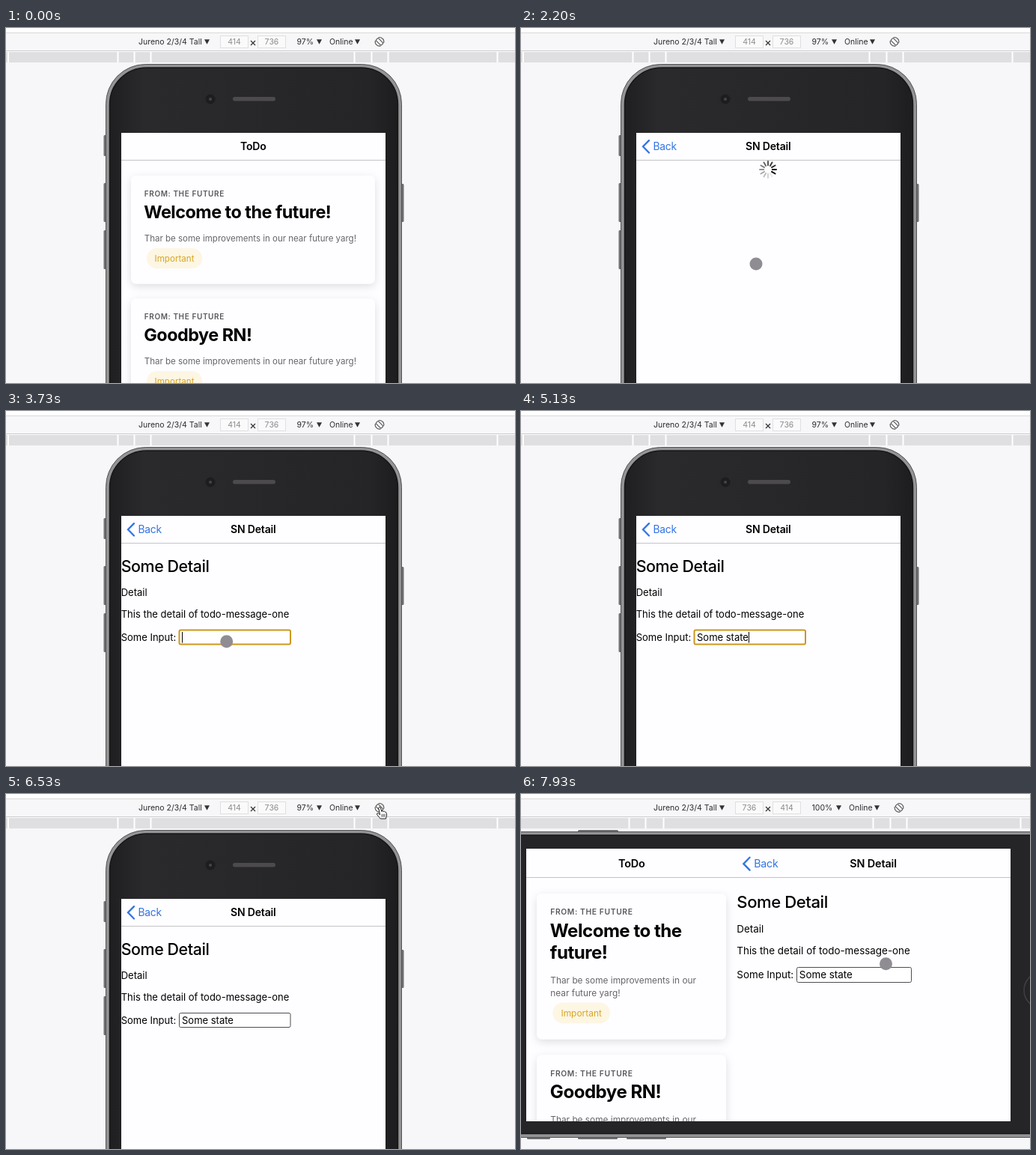
These frames come from a looping animation (680x474 px, 8 s). An HTML page:

```html
<!DOCTYPE html>
<html lang="en">
<head>
<meta charset="utf-8">
<title>Device rotation</title>
<style>
html, body { margin: 0; width: 100%; height: 100%; overflow: hidden; background: #f7f6f8; }
svg { display: block; width: 680px; height: 474px; }
text { font-family: Inter, "Open Sans", sans-serif; white-space: pre; }
</style>
</head>
<body>
<svg id="stage" viewBox="0 0 680 474"></svg>
<script>
const LOOP = 8000;
const ROTATE = 6600;
const INPUT = 'Some state';

const rect = (x, y, w, h, fill, more = '') =>
  `<rect x="${x}" y="${y}" width="${w}" height="${h}" fill="${fill}" ${more}/>`;
const text = (x, y, str, size, weight = 400, fill = '#000', more = '') =>
  `<text x="${x}" y="${y}" font-size="${size}" font-weight="${weight}" fill="${fill}" ${more}>${str}</text>`;
const group = (id, body) => `<g id="${id}">${body}</g>`;
const mid = 'text-anchor="middle"';
const arrowDown = x => `<path d="M${x} 15.2h7l-3.5 6.6z" fill="#333"/>`;

function toolbar(o) {
  const field = (x, v) => rect(x + .5, 10.5, 37, 16, '#fafafb', 'stroke="#e0dfe1"') +
    text(x + 19, 22.3, v, 10.5, 400, '#8c8b8e', mid);
  return text(177, 22.3, 'Jureno 2/3/4 Tall', 10.5, 400, '#2c2b2d') + arrowDown(265) +
    field(286, o.w) + field(336, o.h) +
    '<path d="M327 17l6 6m0-6l-6 6" stroke="#333" stroke-width="1.2"/>' +
    text(388.5, 22.3, o.zoom, 10.5, 400, '#2c2b2d') + arrowDown(415 + o.dx) +
    text(432 + o.dx, 22.3, 'Online', 10.5, 400, '#2c2b2d') + arrowDown(466 + o.dx) +
    `<g transform="translate(${499 + o.dx} 18.3)" fill="none" stroke="#555" stroke-width="1.1">
      <rect x="-2.2" y="-5" width="4.4" height="10" rx="1" transform="rotate(-45)"/>
      <path d="M-1.5 -5.6A5.8 5.8 0 0 1 5.6 1.5M1.5 5.6A5.8 5.8 0 0 1 -5.6 -1.5"/></g>` +
    rect(0, 32, 680, 14, '#dfdee0') +
    o.ticks.map(x => rect(x - 1, 31, 2, 15, '#fff')).join('');
}

const pageHead = (x, y, title, k) => text(x, y, title, 14 * k, 600, '#000', mid + ' letter-spacing="-.15"');

const back = (x, y, k) =>
  `<path transform="translate(${x} ${y}) scale(${k})" d="M9 -8.2L1 0L9 8.2" fill="none" stroke="#3274e4" stroke-width="2.3" stroke-linecap="round"/>` +
  text(x + 14.5 * k, y + 5 * k, 'Back', 13.8 * k, 400, '#3274e4', 'letter-spacing="-.2"');

// Lines flow down the card; y of each block is relative to the card top.
function card(x, y, w, h, k, from, titles, titleY, bodies, bodyY, pillY) {
  const tx = x + 17.8 * k;
  return rect(x, y, w, h, '#fefdff', 'rx="7" filter="url(#shade)"') +
    text(tx, y + from, 'FROM: THE FUTURE', 10 * k, 600, '#59585b', `letter-spacing="${.6 * k}"`) +
    titles.map((s, i) => text(tx - .5, y + titleY + i * 28.8, s, 23.4 * k, 700, '#000', `letter-spacing="${-.5 * k}"`)).join('') +
    bodies.map((s, i) => text(tx, y + bodyY + i * 16.7, s, 11.5 * k, 400, '#666568')).join('') +
    rect(tx + 3.2, y + pillY, 74 * k, 27 * k, '#fcf6e3', `rx="${13.5 * k}"`) +
    text(tx + 3.2 + 37 * k, y + pillY + 17.8 * k, 'Important', 11.6 * k, 400, '#d9a523', mid);
}

function detail(x, ys, k, box, value) {
  return text(x, ys[0], 'Some Detail', 21.4 * k, 500, '#000', `letter-spacing="${-.42 * k}"`) +
    text(x, ys[1], 'Detail', 13 * k) +
    text(x, ys[2], 'This the detail of todo-message-one', 13 * k) +
    text(x, ys[3], 'Some Input:', 13 * k) + box + value;
}

const BODY = 'Thar be some improvements in our near future yarg!';
const WRAPPED = ['Thar be some improvements in our', 'near future yarg!'];
const side = (x, y, w, h) => rect(x, y, w, h, '#6f6e70', 'rx="1.5"');

const uprightPhone =
  side(130.5, 143, 6, 28) + side(130.5, 207, 6, 52) + side(130.5, 270, 6, 52) + side(525, 208, 6.5, 51) +
  rect(133.5, 48.5, 395, 520, '#949395', 'rx="53" stroke="#525153"') +
  rect(138.5, 53, 385, 520, 'url(#bezel)', 'rx="49" stroke="#161517" stroke-width="1.5"') +
  '<circle cx="273" cy="95" r="6.5" fill="#1d1c1e"/><circle cx="273" cy="95" r="2" fill="#454447"/>' +
  rect(303, 92, 57, 5.5, '#4c4a4c', 'rx="2.7"') +
  rect(154, 140, 353, 340, '#fefdff') + rect(154, 176, 353, 1, '#c4c3c6');

const upright = toolbar({ w: 414, h: 736, zoom: '97%', dx: 0, ticks: [3, 149.5, 171.5, 193.5, 465.5, 488.5, 510.5, 656.5] }) +
  uprightPhone +
  group('list', pageHead(330.3, 163, 'ToDo', 1) +
    ['Welcome to the future!', 'Goodbye RN!'].map((s, i) =>
      card(167, 197 + i * 164.3, 326, 144.5, 1, 28, [s], 57, [BODY], 88, 97)).join('')) +
  group('page', pageHead(330.3, 163, 'SN Detail', 1) + back(162, 158.3, 1) +
    group('spinner', Array.from({ length: 12 }, (_, i) =>
      `<path d="M0 -5.8V-11" transform="translate(330 189) rotate(${i * 30})" stroke="#000" stroke-width="2" stroke-linecap="round"/>`).join('')) +
    group('bar', rect(500.5, 180, 2.6, 300, '#dddcdf', 'rx="1.3"')) +
    group('detail', detail(153.7, [215, 246.7, 275.8, 307.2], 1,
      rect(231.5, 292.5, 148.5, 19, '#fff', 'id="box" rx="2"'),
      text(235, 307.2, '', 13, 400, '#000', 'id="typed"') + rect(0, 295, 1, 14.5, '#000', 'id="caret"'))));

const flat = toolbar({ w: 736, h: 414, zoom: '100%', dx: 6, ticks: [144.5, 166.5, 190.5, 470.5, 493.5, 515.5, 667.5] }) +
  side(76, 48, 54, 6) + side(8, 455, 31, 6) + side(76, 455, 53, 6) + side(141, 455, 53, 6) +
  rect(-60, 50.5, 800, 408, '#949395', 'stroke="#525153"') +
  rect(-60, 55, 800, 398.5, '#252426', 'stroke="#161517" stroke-width="1.5"') +
  '<circle cx="696" cy="262" r="24" fill="none" stroke="#413f42" stroke-width="1.5"/>' +
  `<g clip-path="url(#view)">` +
  rect(7, 73, 647, 364, '#fefdff') + rect(7, 111, 647, 1, '#c4c3c6') +
  pageHead(147.8, 98, 'ToDo', 1.03) + pageHead(470.6, 98, 'SN Detail', 1.03) + back(296.3, 93.2, 1.03) +
  card(21, 133, 253, 194.5, 1.03, 28.4, ['Welcome to the', 'future!'], 58, WRAPPED, 120, 145.5) +
  card(21, 348.5, 253, 194.5, 1.03, 28.4, ['Goodbye RN!'], 57.5, WRAPPED, 90.5, 145) +
  detail(288.3, [151.8, 184.5, 214.2, 246.3], 1.032,
    rect(368.5, 231.5, 153, 20, '#fff', 'rx="2" stroke="#4d4c4f"'), text(371.8, 246.3, INPUT, 13.4)) +
  group('flatBar', rect(648, 116, 2.6, 311, '#dddcdf', 'rx="1.3"')) + '</g>';

const stage = document.getElementById('stage');
stage.innerHTML = `<defs>
  <filter id="shade" x="-15%" y="-15%" width="130%" height="135%"><feDropShadow dx="0" dy="3.4" stdDeviation="6" flood-color="#000" flood-opacity=".13"/></filter>
  <linearGradient id="bezel" x2="1"><stop stop-color="#1f1e20"/><stop offset=".12" stop-color="#2a292b"/><stop offset=".9" stop-color="#252426"/><stop offset="1" stop-color="#1d1c1e"/></linearGradient>
  <clipPath id="view"><rect x="7" y="73" width="647" height="364"/></clipPath></defs>` +
  rect(0, 0, 680, 474, '#f7f6f8') + rect(0, 0, 680, 6, '#fff') + rect(0, 6, 680, 1, '#d9d8da') +
  rect(0, 30, 680, 1, '#cbcacd') + rect(0, 31, 680, 1, '#fff') +
  group('upright', upright) + group('flat', flat) +
  group('cursor',
    '<circle id="touch" r="8.5" fill="#8f8d91"/>' +
    '<path id="arrow" d="M0 0V13.5L3.2 10.6L5.4 15.6L7.6 14.6L5.5 9.8H9.8Z" fill="#000" stroke="#fff"/>' +
    `<g id="hand" stroke="#222" stroke-linejoin="round" stroke-linecap="round"><path d="M-1.6 .2Q-.4 -1.6 .9 .1L2.2 5.2Q3.6 4 4.6 5.4Q6 4.6 6.8 6Q8.4 5.6 8.7 7.4L9.2 11L7.8 15H.8L-4 9.4Q-4.3 7.4 -2.3 7.8L-.2 9.4Z" fill="#fff"/>
      <path d="M2.6 9.2V12.4M4.6 9V12.4M6.6 9V12.4" stroke-width=".8"/></g>`);

const el = {};
stage.querySelectorAll('[id]').forEach(e => el[e.id] = e);
const show = (e, on) => e.setAttribute('display', on ? 'inline' : 'none');
const clamp = v => Math.max(0, Math.min(1, v));
const spokes = [...el.spinner.children];

// time, x, y of the pointer
const path = [
  [330, 438.5, 383.5], [600, 369.5, 300.5], [930, 369.5, 300.5], [1200, 349.5, 289.5], [1340, 349.5, 289.5],
  [1640, 327, 306], [1900, 314, 315], [2210, 314, 315], [2530, 309.5, 315.5], [3000, 309, 317], [3130, 307.5, 318],
  [3340, 307.5, 318], [3535, 294.7, 307.8], [3740, 294.7, 307.8], [4200, 297.5, 301.5],
  [5480, 297.5, 301.5], [6270, 499.5, 18], [7480, 499.5, 18], [7630, 512, 60], [7930, 487.5, 226.8]
];

function pointer(t) {
  const i = path.findIndex(p => p[0] > t);
  if (i < 0) return path[path.length - 1].slice(1);
  if (i === 0) return path[0].slice(1);
  const [a, b] = [path[i - 1], path[i]];
  const u = (t - a[0]) / (b[0] - a[0]);
  const e = u * u * (3 - 2 * u);
  return [a[1] + (b[1] - a[1]) * e, a[2] + (b[2] - a[2]) * e];
}

function draw(now) {
  const t = Math.floor((now % LOOP + 5) * .015) / .015 + 5;
  const turned = t >= ROTATE;
  show(el.upright, !turned);
  show(el.flat, turned);

  show(el.list, t < 800);
  show(el.page, t >= 800);
  show(el.spinner, t < 3130);
  show(el.detail, t >= 3130);
  el.bar.setAttribute('opacity', .8 * clamp((1600 - t) / 200));
  el.flatBar.setAttribute('opacity', .8 * clamp((7070 - t) / 200));

  const head = (t - 1338) * .012 + 5.6;
  spokes.forEach((s, i) => {
    const age = ((head - i) % 12 + 12) % 12 / 12;
    s.setAttribute('opacity', Math.max(.08, 1 - age));
  });

  const focus = t >= 3730 && t < 6470;
  el.box.setAttribute('stroke', focus ? '#cc981f' : '#4d4c4f');
  el.box.setAttribute('stroke-width', focus ? 2 : 1);
  const count = t < 4470 ? 0 : Math.min(INPUT.length, 1 + Math.floor((t - 4470) / 70));
  el.typed.textContent = INPUT.slice(0, count);
  const lastKey = count === 0 ? 3730 : count < INPUT.length ? t : 5130;
  const caret = focus && Math.floor((t - lastKey) / 500) % 2 === 0;
  show(el.caret, caret);
  if (caret) el.caret.setAttribute('x', 235 + (count ? el.typed.getComputedTextLength() : 0));

  const [x, y] = pointer(t);
  const inScreen = y > (turned ? 73 : 140);
  el.cursor.setAttribute('transform', `translate(${x.toFixed(2)} ${y.toFixed(2)})`);
  show(el.cursor, t >= 330 && !(t >= 4470 && t < 5530));
  show(el.touch, inScreen);
  show(el.arrow, !inScreen && y > 30);
  show(el.hand, y <= 30);
}

const start = performance.now();
function tick() {
  draw(performance.now() - start);
  requestAnimationFrame(tick);
}
tick();
</script>
</body>
</html>
```
